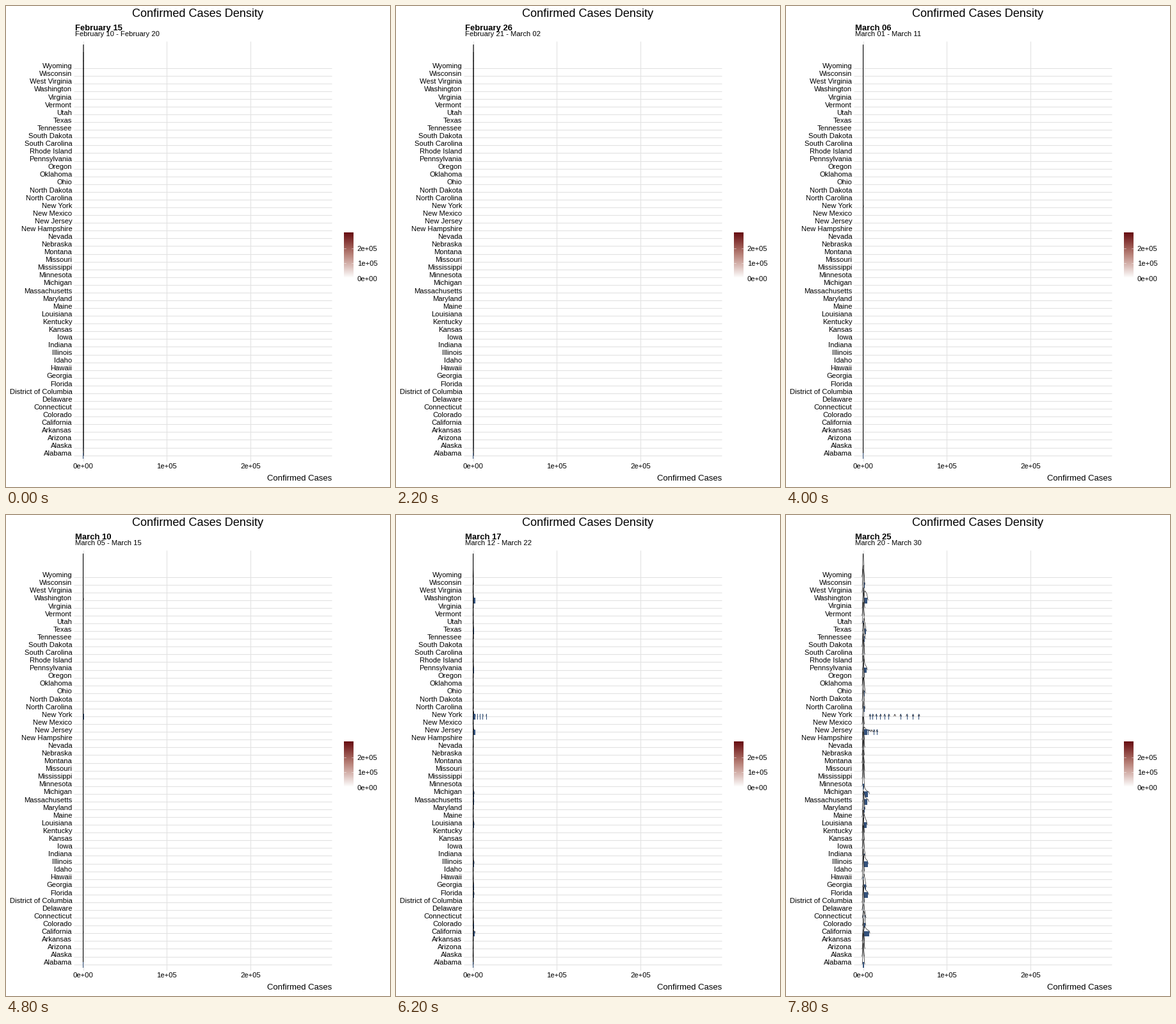
Animation of 600 by 750 pixels, one loop 8000 ms. Source, as a matplotlib script:

```python
import numpy as np
import matplotlib.pyplot as plt
from matplotlib.animation import FuncAnimation
from matplotlib.collections import LineCollection, PolyCollection
from matplotlib.colors import LinearSegmentedColormap

W, H, DPI = 600, 750, 100
PX = 72 / DPI
DAYS, WINDOW = 40, 11
X0, X_UNIT = 120.5, 130.8 / 1e5
BASE, TOP = 700.6, 60.36
GRID = "#e2e2e2"
RUG = "#35537d"
MAX_CASES = 2.97e5

# state: cumulative cases on March 20 and March 30
CASES = {
    "Wyoming": (18, 94), "Wisconsin": (206, 1230), "West Virginia": (8, 145),
    "Washington": (1524, 4896), "Virginia": (122, 1020), "Vermont": (29, 256),
    "Utah": (78, 806), "Texas": (394, 2877), "Tennessee": (233, 1834),
    "South Dakota": (14, 101), "South Carolina": (125, 925),
    "Rhode Island": (54, 488), "Pennsylvania": (303, 4087),
    "Oregon": (114, 606), "Oklahoma": (49, 481), "Ohio": (173, 1933),
    "North Dakota": (26, 109), "North Carolina": (172, 1313),
    "New York": (8310, 66663), "New Mexico": (43, 237),
    "New Jersey": (890, 16636), "New Hampshire": (55, 314),
    "Nevada": (161, 1008), "Nebraska": (37, 145), "Montana": (20, 177),
    "Missouri": (53, 903), "Mississippi": (80, 847), "Minnesota": (115, 576),
    "Michigan": (552, 6498), "Massachusetts": (413, 5752),
    "Maryland": (149, 1413), "Maine": (57, 275), "Louisiana": (585, 4025),
    "Kentucky": (63, 479), "Kansas": (44, 372), "Iowa": (45, 424),
    "Indiana": (79, 1786), "Illinois": (585, 5056), "Idaho": (36, 415),
    "Hawaii": (37, 204), "Georgia": (420, 2809), "Florida": (563, 5473),
    "District of Columbia": (71, 495), "Delaware": (45, 264),
    "Connecticut": (194, 2571), "Colorado": (363, 2311),
    "California": (1177, 7138), "Arkansas": (96, 473),
    "Arizona": (78, 1157), "Alaska": (12, 114), "Alabama": (131, 859),
}
# New York day by day from March 12
NEW_YORK = [328, 421, 525, 732, 967, 1706, 2495, 5365, 8310, 11710, 15793,
            20884, 25681, 30841, 37877, 44876, 52410, 59648, 66663]
STATES = list(CASES)
N = len(STATES)


def growth(a, b):
    """Daily totals from February 10 to March 30."""
    k = np.arange(DAYS + WINDOW - 1) - 39
    early = a * np.exp(0.35 * np.minimum(k, 0)) - 2
    late = a * (b / a) ** (np.maximum(k, 0) / 10) ** 0.8
    return np.floor(np.maximum(np.where(k < 0, early, late), 0))


cases = np.array([growth(*CASES[s]) for s in STATES])
ny = STATES.index("New York")
first = cases.shape[1] - len(NEW_YORK)
cases[ny, first:] = NEW_YORK
cases[ny, :first] = np.floor(NEW_YORK[0] * np.exp(0.35 * np.arange(-first, 0)))

reds = LinearSegmentedColormap.from_list("reds", [
    "#ffffff", "#dcc0bb", "#ba857c", "#914944", "#670d12"])


def date_name(n):
    """Name of the day n days after January 31 in a leap year."""
    return f"February {n:02d}" if n <= 29 else f"March {n - 29:02d}"


def bandwidth(vals):
    """Mean of the rule-of-thumb bandwidths of all rows."""
    sd = vals.std(axis=1, ddof=1)
    q1, q3 = np.percentile(vals, [25, 75], axis=1)
    lo = np.minimum(sd, (q3 - q1) / 1.34)
    lo = np.where(lo > 0, lo, np.where(sd > 0, sd, 1))
    return 0.9 * lo.mean() * WINDOW ** -0.2


def ridge_heights(vals):
    bw = bandwidth(vals)
    grid = np.linspace(-3 * bw, vals.max() + 3 * bw, 512)
    z = (grid - vals[:, :, None]) / bw
    dens = np.exp(-z * z / 2).sum(axis=1)
    return grid, 3 * dens / dens.max()


fig = plt.figure(figsize=(W / DPI, H / DPI), dpi=DPI, facecolor="white")
ax = fig.add_axes([0, 0, 1, 1])
plt.rcParams["font.family"] = "Liberation Sans"


def label(x, y, text, size=11.2, **kw):
    return ax.text(x, y, text, fontsize=size * PX, va="baseline",
                   color="black", **kw)


label(300, 17, "Confirmed Cases Density", 18.1, ha="center")
label(509, 740, "Confirmed Cases", 13.1, ha="right")
day_text = label(108.2, 38, "", 13, weight="bold")
span_text = label(108.2, 47, "")
names = [label(103.3, 0, s, ha="right") for s in STATES]

for k, name in enumerate(["0e+00", "1e+05", "2e+05"]):
    x = X0 + k * 1e5 * X_UNIT
    ax.plot([x, x], [55, 710], color=GRID, lw=1.07 * PX, zorder=1,
            solid_capstyle="butt")
    label(x, 721, name, ha="center")
    y = 424.5 - 23.4 * k
    label(548.6, round(y + 4.3), name)
    for a in (528, 540):
        ax.plot([a, a + 3], [y, y], color="white", lw=0.5 * PX, zorder=3)

ax.imshow(np.linspace(1, 0, 256)[:, None], cmap=reds, aspect="auto",
          extent=(528, 543, 424.5, 354), zorder=2, vmin=0, vmax=1)
ax.set(xlim=(0, W), ylim=(H, 0))
ax.axis("off")

rows = LineCollection([], colors=GRID, linewidths=1.07 * PX, zorder=1)
ridges = PolyCollection([], zorder=4, joinstyle="round")
ax.add_collection(rows, autolim=False)
ax.add_collection(ridges, autolim=False)


def tick(x, y):
    return [(x - .45, y - 3.7), (x + .45, y - 3.7),
            (x + .45, y + 5), (x - .45, y + 5)]


def draw(i):
    mid = 15 + i
    day_text.set_text(date_name(mid))
    span_text.set_text(f"{date_name(mid - 5)} - {date_name(mid + 5)}")

    vals = cases[:, i:i + WINDOW]
    grid, high = ridge_heights(vals)
    level = np.arange(N - 1, -1, -1)
    pitch = (BASE - TOP) / (level + high.max(axis=1)).max()
    ys = BASE - pitch * level
    px = X0 + grid * X_UNIT

    verts, faces, edges, widths = [], [], [], []
    for r, y in enumerate(ys):
        names[r].set_y(round(y + 0.64))
        keep = np.flatnonzero(high[r] >= 0.03)
        for run in np.split(keep, np.flatnonzero(np.diff(keep) > 1) + 1):
            x = px[run]
            top = y - pitch * high[r, run]
            verts.append(np.column_stack([
                np.r_[x[0], x, x[-1]], np.r_[y, top, y]]))
            faces.append(reds(max(grid[run].mean(), 0) / MAX_CASES))
            edges.append((0, 0, 0, 1))
            widths.append(0.6 * PX)
        for v in np.unique(vals[r]):
            verts.append(tick(X0 + v * X_UNIT, y))
            faces.append(RUG)
            edges.append((0, 0, 0, 0))
            widths.append(0)

    rows.set_segments([[(106, y), (509, y)] for y in ys])
    ridges.set_verts(verts, closed=False)
    ridges.set_facecolor(faces)
    ridges.set_edgecolor(edges)
    ridges.set_linewidth(widths)
    return [rows, ridges, day_text, span_text, *names]


anim = FuncAnimation(fig, draw, frames=DAYS, interval=200, repeat=True,
                     repeat_delay=0, blit=False)
plt.show()
```
